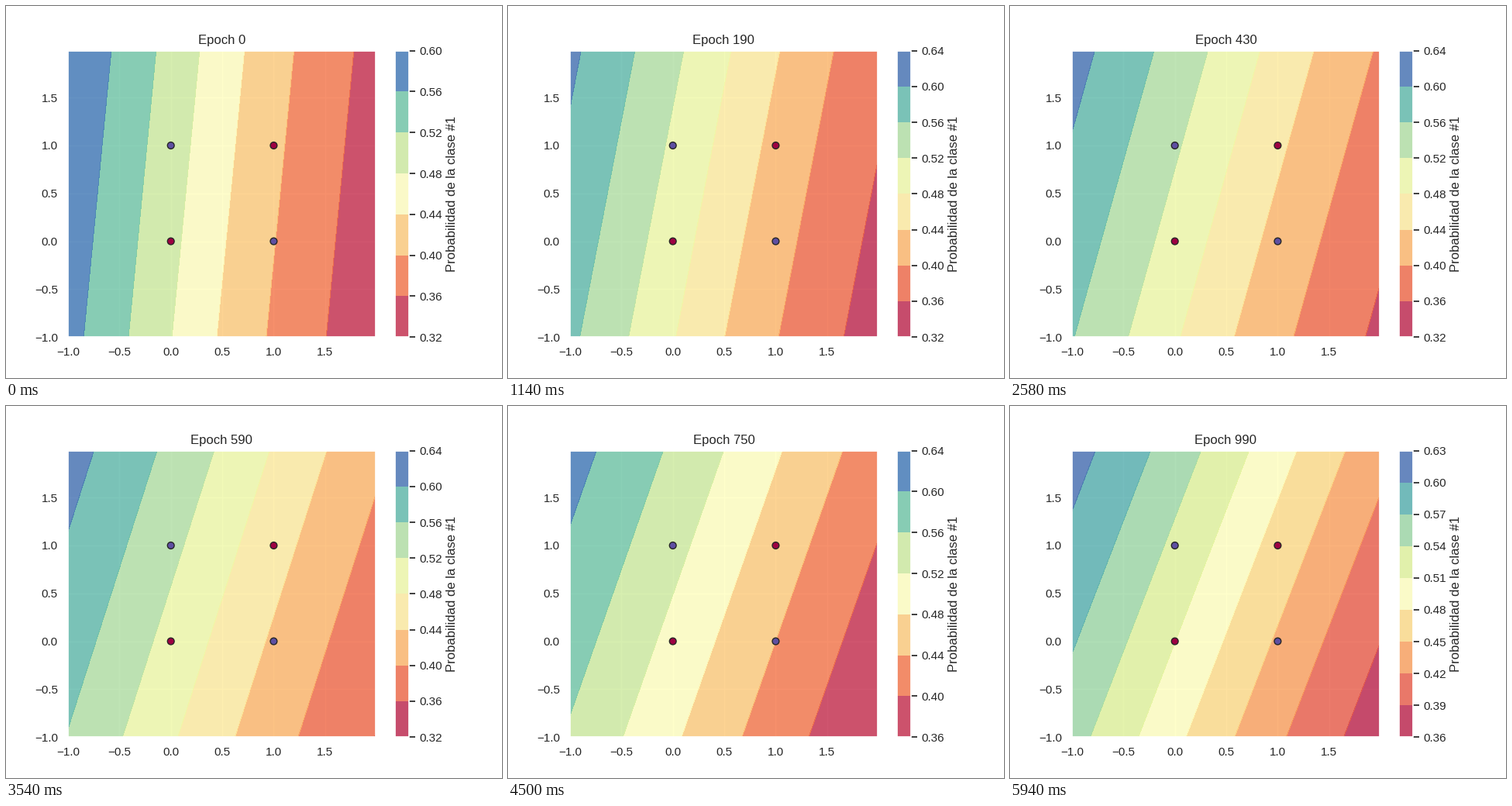
Recreate the animation shown at these times as a matplotlib script. Size 640 px wide and 480 px high, loop 6 s.

```python
import numpy as np
import matplotlib.pyplot as plt
from matplotlib.animation import FuncAnimation

INK = "#262626"
plt.rcParams.update({
    "font.family": "Liberation Sans",
    "text.color": INK, "axes.labelcolor": INK,
    "xtick.color": INK, "ytick.color": INK,
    "axes.facecolor": "#EAEAF2", "axes.edgecolor": "white",
    "axes.linewidth": 1.25, "axes.axisbelow": True,
    "axes.titlesize": 12, "axes.labelsize": 12,
    "xtick.labelsize": 11, "ytick.labelsize": 11,
    "xtick.major.size": 6, "ytick.major.size": 6,
    "xtick.major.width": 1.25, "ytick.major.width": 1.25,
    "xtick.bottom": False, "ytick.left": False,
    "grid.color": "white", "grid.linewidth": 1,
})

W, H, DPI = 640, 480, 100
FRAMES, INTERVAL, EPOCHS = 100, 60, 10
LO, HI = -1, 1.99

axis = np.linspace(LO, HI, 300)
xx, yy = np.meshgrid(axis, axis)


def probability(epoch):
    """Output of one tanh neuron that flattens and tilts as it trains."""
    lean = .428 - .338 * np.exp(-.00162 * epoch)
    scale = 2.713 + .00126 * epoch
    hidden = np.tanh((xx + .201 - lean * (yy + 1)) / scale)
    return 1 / (1 + np.exp(1.03 * hidden))


fig = plt.figure(figsize=(W / DPI, H / DPI), dpi=DPI, facecolor="white")
ax = fig.add_axes([.125, .11, .62, .77])
ax.grid(True)
ticks = np.arange(-1, 1.6, .5)
ax.set(xticks=ticks, yticks=ticks)
ax.scatter([0, 0, 1, 1], [0, 1, 0, 1], c=[0, 1, 1, 0], s=40, cmap="Spectral",
           edgecolors=INK, linewidths=1, zorder=3)
title = ax.set_title("")

state = {"bands": None, "cax": None, "levels": None}


def draw_colorbar(bands):
    if state["cax"] is not None:
        state["cax"].remove()
    cax = fig.add_axes([501.6 / W, .11, 18.48 / W, .77])
    fig.colorbar(bands, cax=cax).set_label("Probabilidad de la clase #1")
    cax.grid(False)
    state["cax"] = cax


def update(i):
    epoch = i * EPOCHS
    if state["bands"] is not None:
        state["bands"].remove()
    bands = ax.contourf(xx, yy, probability(epoch), cmap="Spectral", alpha=.8)
    ax.set(xlim=(LO, HI), ylim=(LO, HI))
    state["bands"] = bands
    if not np.array_equal(bands.levels, state["levels"]):
        draw_colorbar(bands)
        state["levels"] = bands.levels
    title.set_text(f"Epoch {epoch}")
    return []


anim = FuncAnimation(fig, update, frames=FRAMES, interval=INTERVAL,
                     init_func=lambda: update(0), repeat=True, repeat_delay=0)
plt.show()
```
